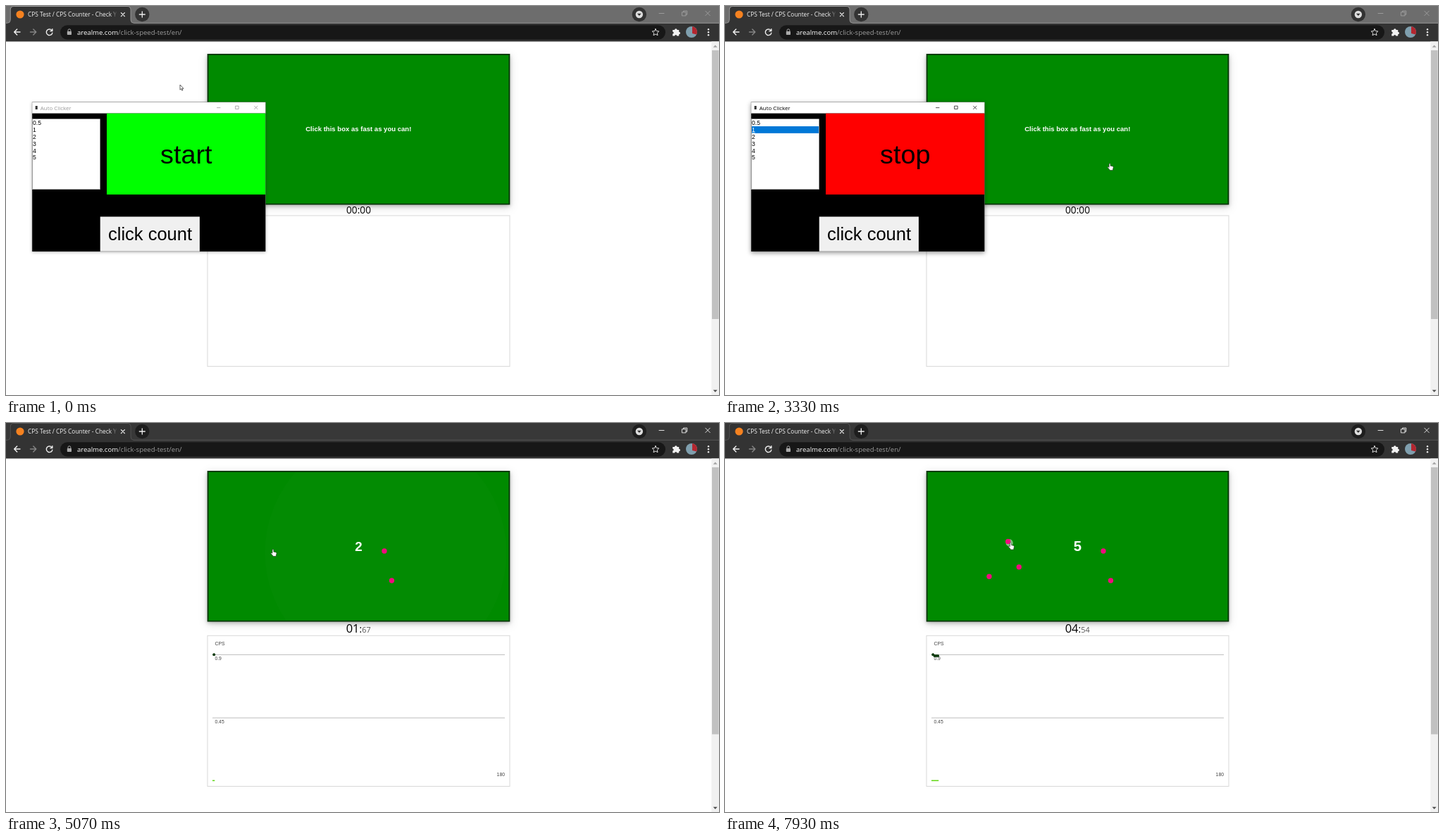
Animation of 1012 by 553 pixels, one loop 8000 ms. Source, as an HTML page:

```html
<!DOCTYPE html>
<html lang="en">
<head>
<meta charset="utf-8">
<title>Click speed test</title>
<style>
html, body { margin: 0; width: 100%; height: 100%; overflow: hidden; background: #fff; }
svg { display: block; width: 100%; height: 100%; }
text { white-space: pre; }
.ui { font-family: "Open Sans", "Noto Sans", sans-serif; }
.arial { font-family: "Liberation Sans", Arial, sans-serif; }
.mid { text-anchor: middle; }
.line { fill: none; stroke-linecap: round; stroke-linejoin: round; }
.board { filter: drop-shadow(0 2px 2.6px rgba(0,0,0,.2)) drop-shadow(0 3px 6px rgba(0,0,0,.17)); }
.app { filter: drop-shadow(0 1px 2px rgba(0,0,0,.25)); }
.app.active { filter: drop-shadow(0 2px 3px rgba(0,0,0,.4)); }
</style>
</head>
<body>
<svg viewBox="0 0 1012 553">
  <defs>
    <clipPath id="boardClip"><rect x="287.5" y="69.8" width="426" height="211"/></clipPath>
    <clipPath id="avatarClip"><circle cx="973" cy="37" r="8"/></clipPath>
    <linearGradient id="fade"><stop offset="0" stop-color="#333" stop-opacity="0"/><stop offset="1" stop-color="#333"/></linearGradient>
  </defs>
  <rect width="1012" height="553" fill="#fff"/>

  <!-- browser frame -->
  <rect id="strip" width="1012" height="25"/>
  <rect y="24" width="1012" height="26.5" fill="#333"/>
  <path id="tabLine" class="line" stroke-width=".9" d="M0 24.3H1.5Q6.3 24.3 6.3 19V5.5Q6.3 .5 11.3 .5H172Q177 .5 177 5.5V19Q177 24.3 182 24.3H1012"/>
  <path d="M2 25Q6.8 24 6.8 19V5.5Q6.8 1 11.3 1H172Q176.5 1 176.5 5.5V19Q176.5 24 181 25Z" fill="#333"/>
  <circle cx="20" cy="12" r="5.6" fill="#f58220"/>
  <text class="ui" x="31" y="15.3" font-size="8.35" fill="#f4f4f4">CPS Test / CPS Counter - Check Y</text>
  <rect x="148" y="4" width="10" height="16" fill="url(#fade)"/>
  <rect x="158" y="4" width="5" height="16" fill="#333"/>
  <path class="line" d="M163.4 9.6l5 5m0-5l-5 5" stroke="#eee" stroke-width="1.3"/>
  <g id="discs"><circle cx="193.3" cy="12" r="10.2"/><circle cx="898.8" cy="12" r="10.2"/></g>
  <path class="line" d="M189.3 12h8m-4-4v8" stroke="#eee" stroke-width="1.3"/>
  <circle cx="898.8" cy="12" r="5.2" fill="#ddd"/>
  <path d="M896 10.7h5.6l-2.8 3.2z" fill="#2c2c2c"/>
  <path id="frameButtons" class="line" stroke-width=".9" d="M927 10.5h7M959.8 8.7h5.2v5.2h-5.2zM961.5 8.5V7h5.2v5.2h-1.5M992.8 7.2l6.4 6.4m0-6.4l-6.4 6.4"/>

  <g class="line" stroke="#f0f0f0" stroke-width="1.4">
    <path d="M20 37h-8.2m3.9-4l-4 4 4 4"/>
    <path d="M34.5 37h8.2m-3.9-4l4 4-4 4" stroke="#858585"/>
    <path d="M65 34.6A4.3 4.3 0 1 0 65.8 38.3M65.8 32.6v3h-3"/>
  </g>
  <rect x="77" y="27.3" width="859" height="20.4" rx="10.2" fill="#171717"/>
  <rect x="86.8" y="36" width="6.2" height="5" rx=".7" fill="#aaa"/>
  <path class="line" d="M88 36v-1.3a1.9 1.9 0 0 1 3.8 0V36" stroke="#aaa" stroke-width="1"/>
  <text class="ui" x="101" y="40.6" font-size="9.55" fill="#9c9c9c"><tspan fill="#fff">arealme.com</tspan>/click-speed-test/en/</text>
  <path class="line" d="M922 32.5l1.4 3.1 3.4.4-2.5 2.3.7 3.4-3-1.7-3 1.7.7-3.4-2.5-2.3 3.4-.4z" stroke="#ddd" stroke-width="1"/>
  <path d="M946.2 34h2.8a1.8 1.8 0 0 1 3.6 0h2.6v2.7a1.8 1.8 0 0 1 0 3.6v2.2h-3a1.5 1.5 0 0 0-3 0h-3v-3a1.5 1.5 0 0 0 0-3z" fill="#f2f2f2"/>
  <g clip-path="url(#avatarClip)">
    <rect x="965" y="29" width="16" height="16" fill="#7f9fae"/>
    <path d="M974 29h8v12l-8-2z" fill="#b3262f"/>
  </g>
  <g fill="#eee"><circle cx="997" cy="33.2" r="1.2"/><circle cx="997" cy="37.2" r="1.2"/><circle cx="997" cy="41.2" r="1.2"/></g>

  <!-- scrollbar -->
  <rect x="1001.3" y="50.5" width="10.7" height="502.5" fill="#f1f1f1"/>
  <rect id="thumb" x="1002" y="63" width="9.6" fill="#c1c1c1"/>
  <path d="M1003.7 58.8h6l-3-3.3z" fill="#a3a3a3"/>
  <path d="M1003.7 545.8h6l-3 3.3z" fill="#505050"/>

  <!-- click board -->
  <rect class="board" x="285.7" y="68" width="429.6" height="214.5" fill="#003300"/>
  <rect x="287.5" y="69.8" width="426" height="211" fill="#008a00"/>
  <g clip-path="url(#boardClip)"><circle id="ripple" fill="#fff"/></g>
  <g id="marks" fill="#f00b7d"></g>
  <text id="count" class="arial mid" x="500.5" y="181.8" font-weight="700" fill="#fff"></text>

  <g id="idle">
    <text class="arial mid" x="500.3" y="178.4" font-size="9.55" font-weight="700" fill="#fff">Click this box as fast as you can!</text>
    <text class="ui mid" x="500.5" y="294.7" font-size="13.7">00:00</text>
    <rect x="286" y="298" width="429" height="214.3" fill="#fff" stroke="#d8d8d8"/>
    <g id="app" class="app">
      <rect x="36.8" y="136.4" width="331.7" height="212.8" fill="#888"/>
      <rect x="37.3" y="137" width="330.9" height="15.7" fill="#fff"/>
      <rect x="37.3" y="152.7" width="330.9" height="196.2"/>
    </g>
    <rect x="41.7" y="142" width="3" height="5" fill="#333"/>
    <text id="caption" class="ui" x="48.8" y="147.7" font-size="7.9">Auto Clicker</text>
    <path id="appButtons" class="line" d="M299.5 144.6h4.5M326 142.2h4.2v4.2H326zM352.6 142.2l4.4 4.4m0-4.4l-4.4 4.4" stroke-width=".8"/>
    <rect x="37.5" y="160.7" width="96" height="100" fill="#fff" stroke="#a0a0a0" stroke-width=".6"/>
    <g id="pick">
      <rect x="38" y="171" width="95" height="9.9" fill="#0078d7"/>
      <path d="M38.3 180.2h4.5" stroke="#fff" stroke-width=".7"/>
    </g>
    <g id="options" class="arial" font-size="8.6"></g>
    <rect id="toggle" x="143" y="152.7" width="225.2" height="115.3"/>
    <text id="toggleText" class="arial mid" x="255.8" y="223.5" font-size="37.8"></text>
    <rect x="133.7" y="299.5" width="141.2" height="49.3" fill="#f0f0f0"/>
    <text class="arial mid" x="204.5" y="333" font-size="25.5">click count</text>
  </g>

  <g id="run">
    <text class="ui" x="482.7" y="298" font-size="16.5"><tspan id="secs"></tspan><tspan font-size="13.7">:</tspan><tspan id="cents" font-size="10.9" fill="#555"></tspan></text>
    <rect x="286" y="302.3" width="429" height="214.2" fill="#fff" stroke="#d8d8d8"/>
    <path d="M293 329.4h415M293 419.2h415" stroke="#bdbdbd"/>
    <g class="arial" font-size="6.85" fill="#444">
      <text x="296.6" y="316">CPS</text>
      <text id="top" x="296.4" y="336.8"></text>
      <text id="half" x="296.4" y="426.6"></text>
      <text x="708" y="501.8" text-anchor="end">180</text>
    </g>
    <rect id="trail" x="293" y="507.6" height="1.5" fill="#5fd60f"/>
    <g id="points" fill="#123d12"></g>
  </g>

  <path id="arrow" d="M0 0V7.2L1.7 5.7 2.8 8.2 3.9 7.7 2.8 5.3H5Z" fill="#fff" stroke="#222" stroke-width=".7"/>
  <path id="hand" d="M-1 .8Q0-.6 .9 .8V3.6L4 4.2Q5.3 4.6 5.1 6L4.4 8.6V10H-.3V9L-3 6Q-3.3 4.7-2 5L-1 5.8Z" fill="#fff" stroke="#1c2e1c" stroke-width=".6"/>
</svg>
<script>
const LOOP = 8000, FPS = 15;
const PICK_AT = 800, TOGGLE_AT = 1260;
const FIRST_CLICK = 3390, CLICK_GAP = 1128;
const RIPPLE_MS = 690, RIPPLE_R = 176;
const POINT_GAP = 2.31;

const CLICKS = [[547.5, 224], [537, 182], [417.3, 204.7], [375, 218.2], [401.7, 168.4]]
  .map(([x, y], i) => ({ t: FIRST_CLICK + i * CLICK_GAP, x, y }));

// where the pointer rests or turns between clicks
const TURNS = [
  [0, 247, 112], [850, 56, 175], [1150, 211, 220], [1270, 211, 220], [1667, 410, 203.5],
  [1867, 703, 280], [2070, 454, 198], [2600, 454, 198], [3667, 559, 213.5],
  [5067, 379, 179.5], [6250, 392, 151], [LOOP, 417, 175]
].map(([t, x, y]) => ({ t, x, y }));
const PATH = [...TURNS, ...CLICKS].sort((a, b) => a.t - b.t);

const el = id => document.getElementById(id);
const set = (node, attrs) => { for (const k in attrs) node.setAttribute(k, attrs[k]); };
const show = (node, on) => set(node, { visibility: on ? "visible" : "hidden" });
const pad = n => String(n).padStart(2, "0");
const smooth = p => p * p * (3 - 2 * p);

function add(parent, tag, attrs) {
  const node = document.createElementNS("http://www.w3.org/2000/svg", tag);
  set(node, attrs);
  return parent.appendChild(node);
}

// the CSS "ease" curve, solved by bisection
function ease(p) {
  let lo = 0, hi = 1, u = 0.5;
  for (let i = 0; i < 20; i++) {
    if (0.75 * u * (1 - u) + u ** 3 < p) lo = u; else hi = u;
    u = (lo + hi) / 2;
  }
  return 0.3 * u * (1 - u) ** 2 + 3 * u * u * (1 - u) + u ** 3;
}

function pointer(t) {
  const i = PATH.findIndex(k => k.t > t);
  const a = PATH[i - 1], b = PATH[i];
  const p = smooth((t - a.t) / (b.t - a.t));
  return { x: a.x + (b.x - a.x) * p, y: a.y + (b.y - a.y) * p };
}

const options = ["0.5", 1, 2, 3, 4, 5].map((label, i) => {
  const node = add(el("options"), "text", { x: 38, y: 169.1 + i * 9.85 });
  node.textContent = label;
  return node;
});
const marks = CLICKS.map(({ x, y }) => add(el("marks"), "circle", { cx: x, cy: y, r: 3.7 }));
const points = CLICKS.slice(1).map((_, i) =>
  add(el("points"), "circle", { cx: 295.2 + i * POINT_GAP, cy: i ? 330.9 : 329.3, r: 2 }));

function drawApp(t) {
  const picked = t >= PICK_AT, on = t >= TOGGLE_AT;
  el("app").classList.toggle("active", picked);
  set(el("caption"), { fill: picked ? "#000" : "#999" });
  set(el("appButtons"), { stroke: picked ? "#222" : "#999" });
  set(el("pick"), { opacity: +picked });
  set(options[1], { fill: picked ? "#fff" : "#000" });
  set(el("toggle"), { fill: on ? "#f00" : "#0f0" });
  el("toggleText").textContent = on ? "stop" : "start";
}

function drawRun(t, n) {
  const { t: start, x, y } = CLICKS[n - 1];
  const grown = ease(Math.min(1, (t - start) / RIPPLE_MS));
  set(el("ripple"), { cx: x + 2, cy: y + 2, r: RIPPLE_R * grown, opacity: 0.5 * (1 - grown) });

  set(el("count"), { "font-size": 17.8 + 0.5 * n });
  el("count").textContent = n;
  const total = Math.floor((t - FIRST_CLICK) / 10);
  el("secs").textContent = pad(Math.floor(total / 100));
  el("cents").textContent = pad(total % 100);
  el("top").textContent = n > 1 ? "0.9" : "0";
  el("half").textContent = n > 1 ? "0.45" : "0.00";
  set(el("trail"), { width: POINT_GAP * (n - 1) + 1 });
}

function draw(t) {
  const n = CLICKS.filter(c => c.t <= t).length, running = n > 0;
  set(el("strip"), { fill: running ? "#383838" : "#6d6d6d" });
  set(el("discs"), { fill: running ? "#1e1e1e" : "#333" });
  set(el("tabLine"), { stroke: running ? "#5c5c5c" : "#a2a2a2" });
  set(el("frameButtons"), { stroke: running ? "#f0f0f0" : "#a0a0a0" });
  set(el("thumb"), { height: running ? 379.5 : 382 });
  set(el("idle"), { display: running ? "none" : "inline" });
  set(el("run"), { display: running ? "inline" : "none" });
  show(el("ripple"), running);
  show(el("count"), running);
  marks.forEach((m, i) => show(m, i < n));
  points.forEach((p, i) => set(p, { opacity: +(i < n - 1) }));
  if (running) drawRun(t, n); else drawApp(t);

  const { x, y } = pointer(t);
  const overBoard = running || x > 369;
  show(el("arrow"), !overBoard);
  show(el("hand"), overBoard);
  set(el(overBoard ? "hand" : "arrow"), { transform: `translate(${x} ${y})` });
}

const began = performance.now();
function tick() {
  const t = (performance.now() - began) % LOOP;
  // the picture advances in whole steps; the offset absorbs rounded times
  draw(Math.floor((t + 5) * FPS / 1000) * 1000 / FPS % LOOP);
  requestAnimationFrame(tick);
}
draw(0);
requestAnimationFrame(tick);
</script>
</body>
</html>
```
